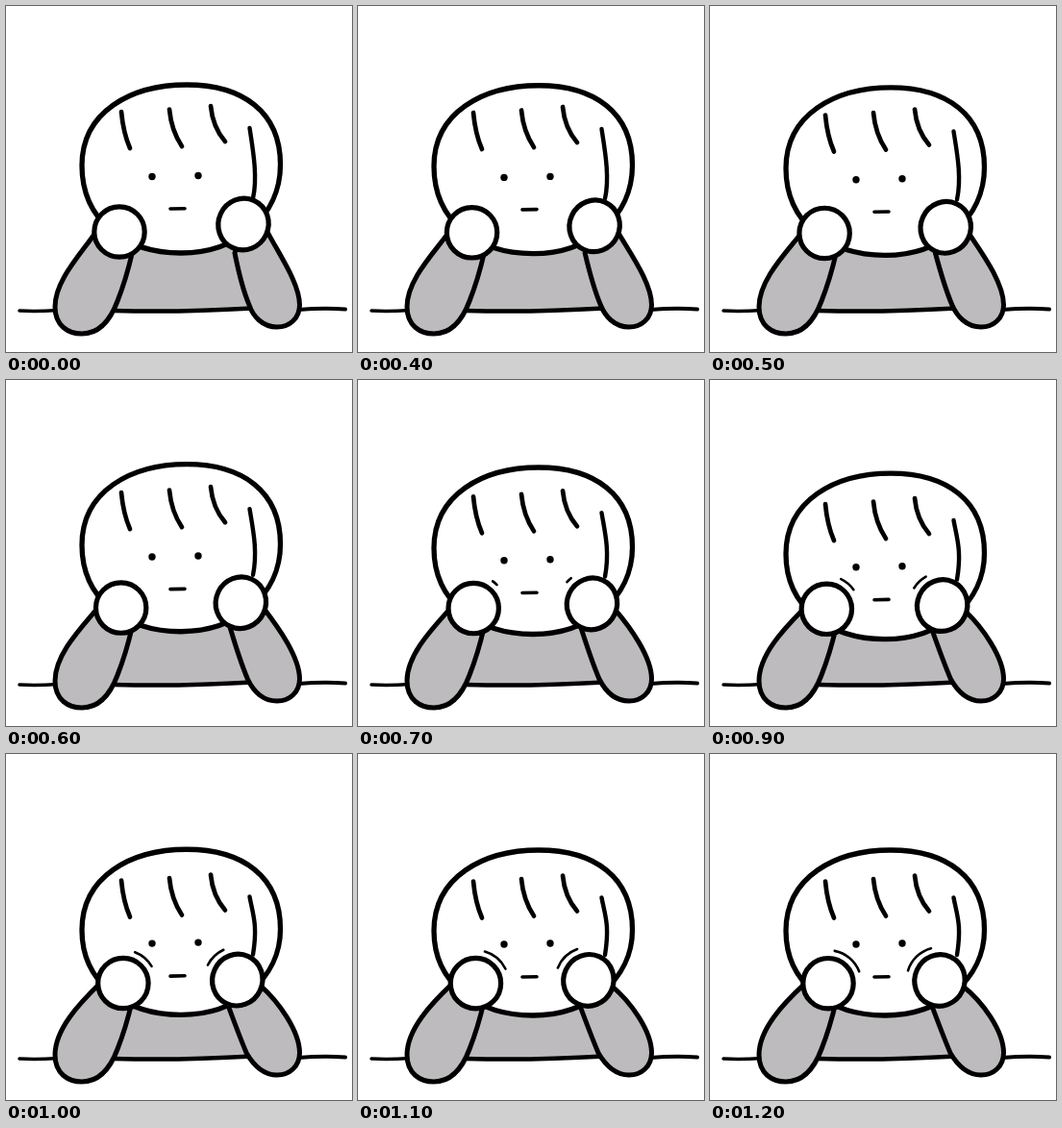
These frames come from a looping animation (360x360 px, 1.6 s). An HTML page:

```html
<!DOCTYPE html>
<html lang="en">
<head>
<meta charset="utf-8">
<title>Sinking into the hands</title>
<style>
  html, body { margin: 0; height: 100%; overflow: hidden; background: #fff; }
  svg { display: block; width: 100%; height: 100%; }
  path, ellipse { stroke: #000; stroke-linecap: round; stroke-linejoin: round; }
</style>
</head>
<body>
<svg id="stage" viewBox="0 0 360 360"></svg>
<script>
const stage = document.getElementById("stage");
const GRAY = "#bebbbe";
const LAST_POSE = 9;

const line = (d, width, fill = "none") =>
  `<path d="${d}" stroke-width="${width}" fill="${fill}"/>`;

const oval = (x, y, rx, ry, width, fill, turn = 0) =>
  `<ellipse cx="${x}" cy="${y}" rx="${rx}" ry="${ry}" stroke-width="${width}"
    fill="${fill}" transform="rotate(${turn} ${x} ${y})"/>`;

// Cheek fold: an arc around a hand, centred on an angle in degrees.
function crease(x, y, middle, half) {
  if (half <= 0) return "";
  const radius = 34.5;
  const point = degrees => {
    const a = degrees * Math.PI / 180;
    return `${x + radius * Math.cos(a)} ${y + radius * Math.sin(a)}`;
  };
  return line(`M${point(middle - half)} A${radius} ${radius} 0 0 1 ${point(middle + half)}`, 2.6);
}

function drawHead(sink) {
  const top = 82 + 18 * sink;
  const side = top + 84;
  const chin = 257 + 15 * sink;
  const hair = 22.5 * sink;
  const eyes = 177 + 20.5 * sink;
  const mouth = 211 + 21 * sink;

  const outline = line(`M79 ${side} C79 ${top + 28} 130 ${top} 188 ${top}
    S285.5 ${top + 28} 285.5 ${side - 1} C285.5 ${chin - 38} 240 ${chin} 182 ${chin}
    S79 ${chin - 34} 79 ${side}Z`, 5.3, "#fff");

  const strand = (x, y, dx, dy) =>
    line(`M${x} ${y + hair} q2 22 ${dx} ${dy}`, 4.7);
  const strands = strand(120, 110, 9, 38) + strand(170, 107.5, 13, 38.5) +
    strand(213, 104, 15, 37) +
    line(`M253.5 ${127 + hair} C257 ${150 + hair * .8} 262 178 257 ${200 + hair * .4}`, 4.4);

  const face = oval(152, eyes + .5, 3.7, 3.7, 0, "#000") +
    oval(200, eyes - .5, 3.7, 3.7, 0, "#000") +
    line(`M171 ${mouth} L186 ${mouth - .3}`, 3.6);

  return outline + strands + face;
}

function draw(pose) {
  const t = pose / LAST_POSE;
  const press = 1 - (1 - t) ** 2;
  const u = Math.min(1, pose / 8);
  const sink = u * u * (3 - 2 * u);
  const leftX = 118 + 5 * t, leftY = 235 + 3.7 * press;
  const rightX = 247 - 8 * t, rightY = 227 + 8.5 * press;
  const fold = 4.8 * (pose - 3);

  const torso = `<path d="M110 317 L128 245 H242 L262 315Z" style="stroke:none" fill="${GRAY}"/>`;
  const desk = line("M14 317 Q32 318 54 316.5", 3.5) +
    line("M112 317 Q180 319 256 314.5", 4.5) +
    line("M304 316 Q330 314 353 315.5", 4);

  const arms = line(`M${leftX - 25} ${leftY + 1} C77 259 51 286 51 313
      C51 333 65 341 79 341 C100 341 110 323 116 307
      Q125 284 131 258`, 5, GRAY) +
    line(`M${rightX + 24} ${rightY + 6} C283 257 305.5 288 305.5 311
      C305.5 325 295 334 282 334 C267 334 257 323 ${253 - 3 * press} 311
      Q${245 - 3 * press} 292 ${238 - 9 * press} 257 L${rightX} ${rightY}`, 5, GRAY);

  const hands = oval(leftX, leftY, 26.2, 26.2, 5.2, "#fff") +
    oval(rightX, rightY, 26, 27, 5.2, "#fff", 25);

  const creases = crease(leftX, leftY, -50, fold) + crease(rightX, rightY, 226, fold);

  stage.innerHTML = torso + desk + drawHead(sink) + creases + arms + hands;
}

// Rest, sink in nine 100 ms steps, rest again.
let shown = -1;
function frame() {
  const step = Math.floor(performance.now() % 1600 / 100);
  const pose = Math.min(LAST_POSE, Math.max(0, step - 3));
  if (pose !== shown) draw(shown = pose);
  requestAnimationFrame(frame);
}
frame();
</script>
</body>
</html>
```
